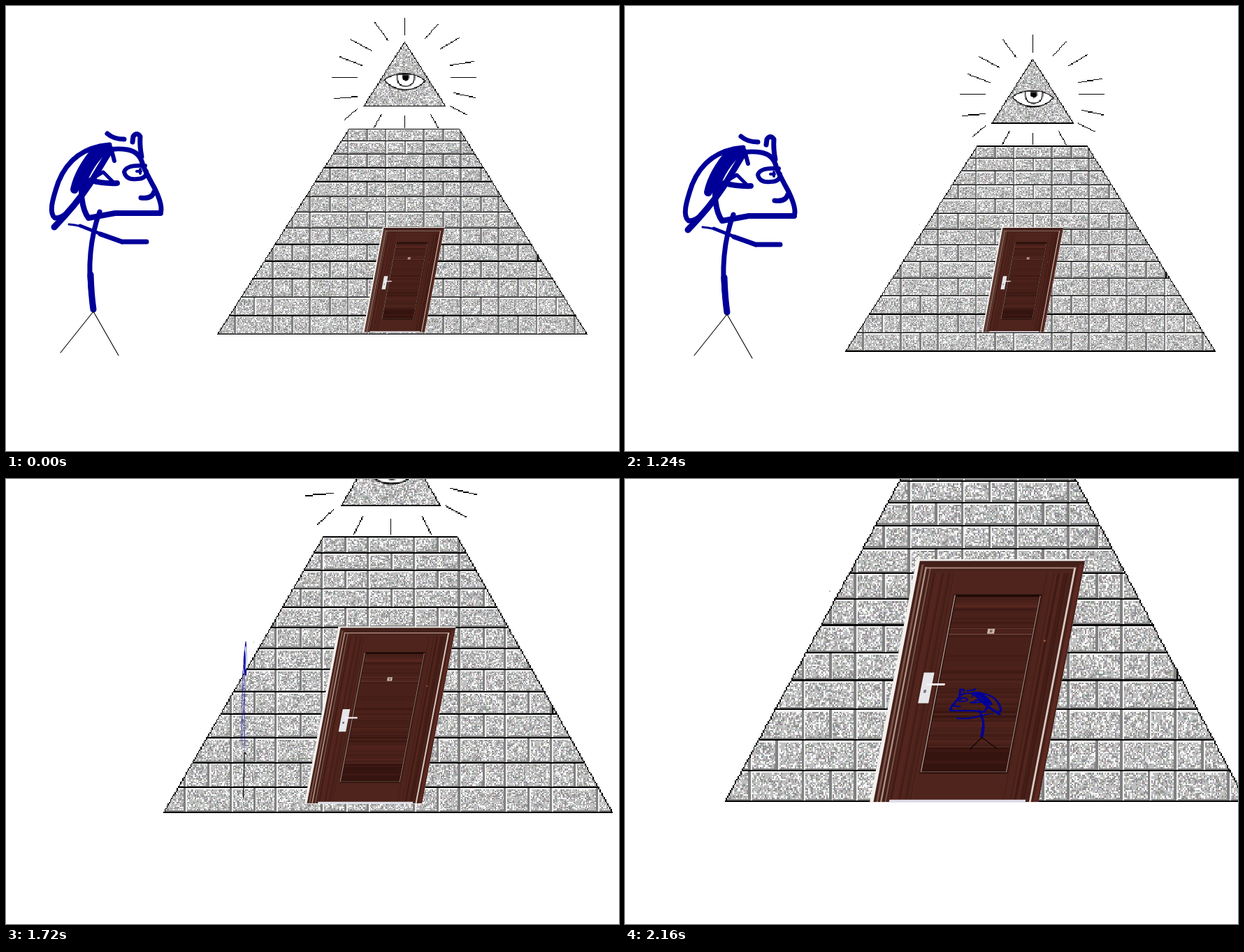
Animation of 877 by 638 pixels, one loop 2.2 s. Source, as an HTML page with a canvas:

```html
<!DOCTYPE html>
<html lang="en">
<head>
<meta charset="utf-8">
<title>Pyramid door</title>
<style>
  html, body { margin: 0; width: 100%; height: 100%; overflow: hidden; background: #fff; }
  canvas { display: block; }
</style>
</head>
<body>
<canvas id="stage" width="877" height="638"></canvas>
<script>
const LOOP = 2200, WALK_START = 1240, STEP = 40, LAST_STEP = 23;
const ctx = document.getElementById('stage').getContext('2d');

let seed = 4711;
const rand = () => (seed = seed * 16807 % 2147483647) / 2147483647;

// --- Pyramid: a coarse bitmap, painted once and stretched later ---
const CELL = 1.325, LEFT = 302, TOP = 15.5, BASE = 470.5;
const ROWS = [176, 193, 212, 231, 252, 272, 295, 318, 341, 365, 390, 417, 443, 470];
const RAYS = [
  [570, 17, 570, 41], [527, 24, 546, 48], [617, 26, 599, 46], [493, 47, 522, 63],
  [648, 44, 621, 60], [477, 73, 509, 84], [669, 79, 635, 84], [466, 102, 502, 102],
  [636, 102, 672, 102], [469, 132, 502, 129], [640, 124, 670, 131], [484, 163, 502, 147],
  [634, 143, 659, 155], [537, 155, 526, 173], [570, 157, 570, 173], [607, 155, 618, 173]
];
const sprite = document.createElement('canvas');
sprite.width = 401;
sprite.height = 345;
const pen = sprite.getContext('2d');
const col = x => Math.round((x - LEFT) / CELL);
const row = y => Math.round((y - TOP) / CELL);

function pixelLine(x0, y0, x1, y1) {
  const c = col(x0), r = row(y0), dc = col(x1) - c, dr = row(y1) - r;
  const n = Math.max(Math.abs(dc), Math.abs(dr));
  pen.fillStyle = '#000';
  for (let i = 0; i <= n; i++) {
    pen.fillRect(Math.round(c + dc * i / n), Math.round(r + dr * i / n), 1, 1);
  }
}

// Fills a polygon with granite speckle, then paints more inside it and outlines it.
function stone(points, paintInside) {
  pen.save();
  pen.beginPath();
  points.forEach(([x, y]) => pen.lineTo(col(x) + .5, row(y) + .5));
  pen.clip();
  const ys = points.map(p => row(p[1]));
  for (let r = Math.min(...ys); r <= Math.max(...ys); r++) {
    for (let c = 0; c < sprite.width; c++) {
      const v = rand();
      const light = v < .25 ? 98 : v < .75 ? 75 : 57;
      pen.fillStyle = `hsl(${360 * rand() | 0}, 6%, ${light}%)`;
      pen.fillRect(c, r, 1, 1);
    }
  }
  paintInside();
  pen.restore();
  points.forEach((p, i) => pixelLine(...p, ...points[(i + 1) % points.length]));
}

function seam(x, r, h) {
  pen.fillStyle = '#808080';
  pen.fillRect(col(x) - 1, r, 2, h);
  pen.fillStyle = '#f0f0f0';
  pen.fillRect(col(x) + 1, r, 1, h);
}

function bricks() {
  for (let i = 0; i < ROWS.length - 1; i++) {
    const r = row(ROWS[i]), h = row(ROWS[i + 1]) - r;
    pen.fillStyle = '#f4f4f4';
    pen.fillRect(0, r + 1, sprite.width, 1);
    pen.fillStyle = '#808080';
    pen.fillRect(0, r + h - 1, sprite.width, 1);
    for (let n = 0; n < 10; n++) {
      const x = 327 + 54 * n;
      seam(x, r + 1, h - 1);
      if ((n + i) % 2) seam(x + 28, r + 1, h - 1);
    }
    pen.fillStyle = '#000';
    pen.fillRect(0, r + h, sprite.width, 1);
  }
}

function paintEye() {
  pen.setTransform(1 / CELL, 0, 0, 1 / CELL, -LEFT / CELL, -TOP / CELL);
  pen.lineWidth = 1.5;
  pen.strokeStyle = '#000';
  const shape = (path, fill) => {
    pen.fillStyle = fill;
    pen.fill(path);
    pen.stroke(path);
  };
  shape(new Path2D('M541 106Q553 97 570 97Q588 97 600 107Q589 120 570 120Q552 119 541 106Z'), '#fff');
  shape(new Path2D('M560 98Q558 115 572 115Q586 114 584 98Z'), '#fff');
  shape(new Path2D('M568 100H576V104L572 107L568 104Z'), '#000');
  pen.resetTransform();
}

stone([[490, 176], [648, 176], [831, 470], [302, 470]], bricks);
stone([[570, 51], [628, 143], [511, 143]], () => {});
paintEye();
RAYS.forEach(ray => pixelLine(...ray));
pixelLine(760, 359, 760, 364);
pixelLine(761, 361, 761, 364);
pen.fillStyle = '#bbb';
pen.fillRect(col(408), row(289), 1, 1);

function drawPyramid(dx, dy, k) {
  const sx = 1 + .0178 * k, sy = 1 + .0286 * k;
  ctx.imageSmoothingEnabled = false;
  ctx.drawImage(sprite, LEFT + dx - 7.5 * k, BASE + dy - 1.44 * k - (BASE - TOP) * sy,
    sprite.width * CELL * sx, sprite.height * CELL * sy);
}

// --- Door: painted in percent of its slanted frame: x, y, width, height, colour ---
const DOOR = [
  [-1.6, -.7, 101.6, 101, '#f4f0ee'],
  [.6, 0, 99.4, 100, '#43201a'],
  [2.2, 1.5, 1.2, 98.5, '#7d5549'],
  [4.6, 2.5, 1, 97.5, '#b39286'],
  [7.4, 3, .8, 97, '#7d564a'],
  [4.6, 2.6, 91, .6, '#a98478'],
  [9, 4, 84, 95, '#4e241c'],
  [94.2, 3, 1.2, 97, '#dcc8bf'],
  [97, 1.5, 2.2, 98.5, '#5e2820']
];
const PANEL = [
  [25, 13.9, 53, 74.3, '#1e0a07'],
  [25.4, 14.2, .7, 73.6, '#a58a82'],
  [76.8, 14.5, .7, 73.4, '#8f7168'],
  [25.4, 87.3, 51.8, .4, '#6b463c'],
  [26.6, 15, 50, 72, '#4a211a'],
  [26.6, 77, 50, 10, '#35140f'],
  [26.6, 28, 50, .3, '#75493e'],
  [26.6, 30.3, 50, .3, '#75493e'],
  [26.6, 71, 50, .3, '#613329'],
  [26.6, 77, 50, .3, '#613329']
];
const FITTINGS = [
  [49.5, 28.2, 4.2, 2, '#cdbab0'],
  [50.8, 28.6, 1.6, 1.1, '#80665c'],
  [84.4, 32.8, 1.2, .7, '#a35a42'],
  [16, 46.3, 6.3, 12.8, '#e6e6ea'],
  [18, 53.5, 1.5, 1.2, '#77727c'],
  [19, 50.8, 11, .9, '#f2f2f5'],
  [10, 99.1, 82, 1.1, '#dcdce6']
];
const grainColor = () => rand() < .55 ? 'rgba(20,5,3,.15)' : 'rgba(125,60,46,.13)';
const panelGrain = Array.from({ length: 55 }, () =>
  [26.6, 15 + 71 * rand(), 50, .4 + .8 * rand(), grainColor()]);
const leafGrain = Array.from({ length: 34 }, (_, i) =>
  [(i % 2 ? 9 : 78) + 14 * rand(), 5, .4 + .8 * rand(), 94, grainColor()]);
const doorParts = [...DOOR, ...leafGrain, ...PANEL, ...panelGrain, ...FITTINGS];

function drawDoor(k) {
  const x = 540 - 5.2 * k, right = 627 + 1.35 * k, footX = 512 - 6.87 * k;
  const y = 318 - 8.72 * k, foot = 467.5 - .2 * k;
  ctx.setTransform((right - x) / 100, 0, (footX - x) / 100, (foot - y) / 100, x, y);
  for (const [u, v, w, h, color] of doorParts) {
    ctx.fillStyle = color;
    ctx.fillRect(u, v, w, h);
  }
  ctx.resetTransform();
}

// --- Figure: brush strokes as [width, path] ---
const BRUSH = [
  [7, 'M148 199C112 202 88 220 75 252C66 278 61 297 70 304Q82 304 96 288'],
  [9, 'M69 317Q100 285 120 255L146 212'],
  [12, 'M98 263Q104 235 130 205M108 258Q118 225 144 203M104 246L124 214'],
  [8, 'M112 246C104 262 109 292 118 304L156 297H221'],
  [7, 'M221 297Q225 287 213 262Q203 244 196 229Q192 209 174 206Q155 203 140 208'],
  [7, 'M194 216Q191 201 192 187Q187 180 182 187L181 195'],
  [7, 'M145 183Q154 191 169 191'],
  [6, 'M150 203L155 222'],
  [6, 'M199 229Q172 227 169 238Q172 250 187 248Q201 248 201 237'],
  [4, 'M187 237H193M192 234V240'],
  [7, 'M193 275Q209 277 212 266'],
  [8, 'M121 250Q140 255 159 254'],
  [5, 'M116 252L139 238L154 253'],
  [7, 'M134 295C121 330 116 375 123 420'],
  [9, 'M121 385Q122 415 125 435'],
  [3, 'M90 313Q106 314 125 322'],
  [5, 'M106 315L166 339'],
  [7, 'M135 327L166 338H201']
].map(([width, d]) => [width, new Path2D(d)]);
const LEGS = new Path2D('M78 497L125 438L161 501');

function drawFigure(pose) {
  ctx.setTransform(pose);
  ctx.lineCap = ctx.lineJoin = 'round';
  ctx.strokeStyle = '#000099';
  for (const [width, path] of BRUSH) {
    ctx.lineWidth = width;
    ctx.stroke(path);
  }
  ctx.resetTransform();
  const legs = new Path2D();
  legs.addPath(LEGS, pose);
  ctx.lineWidth = 1.1;
  ctx.strokeStyle = '#000';
  ctx.stroke(legs);
}

// The horizontal axis swings half a turn while the vertical one only shrinks.
function walkPose(k) {
  const turn = Math.PI * k / LAST_STEP, sx = 1 - .0235 * k, sy = 1 - .0317 * k;
  return new DOMMatrix([sx * Math.cos(turn), sx * Math.sin(turn), 0, sy, 164 + 14.7 * k, 345 - .04 * k])
    .translate(-143, -341);
}

// --- Speech bubble: words as [time, x, baseline, text] ---
const WORDS = [
  [160, 257, 86, 'Blah'], [360, 204, 114, 'Blah'], [560, 275.5, 114, 'Blah'],
  [720, 324, 114, 'Blah'], [880, 249, 149, 'Calculator']
];
const TAIL = new Path2D('M211 186Q233 217 237 232Q235 250 213 278M267 207Q245 253 213 279M234 202L240 217L244 203');

function drawBubble(t) {
  ctx.fillStyle = ctx.strokeStyle = '#000';
  ctx.beginPath();
  ctx.ellipse(280.5, 129, 103, 77, 0, 0, 2 * Math.PI);
  ctx.fill();
  ctx.lineWidth = 8;
  ctx.stroke(TAIL);
  ctx.fillStyle = '#fff';
  ctx.font = '19.3px "Liberation Serif", serif';
  for (const [start, x, y, text] of WORDS) {
    if (t >= start) ctx.fillText(text, x, y);
  }
}

function draw(t) {
  const walking = t >= WALK_START;
  const k = walking ? Math.min(LAST_STEP, Math.floor((t - WALK_START) / STEP)) : 0;
  ctx.fillStyle = '#fff';
  ctx.fillRect(0, 0, 877, 638);
  drawPyramid(t < 880 ? 0 : 13, t < 160 ? 0 : t < 880 ? 18.5 : 24.5, k);
  drawDoor(k);
  drawFigure(walking ? walkPose(k) : new DOMMatrix());
  if (t >= 160 && !walking) drawBubble(t);
}

const begin = performance.now();
function tick() {
  draw((performance.now() - begin) % LOOP);
  requestAnimationFrame(tick);
}
tick();
</script>
</body>
</html>
```
